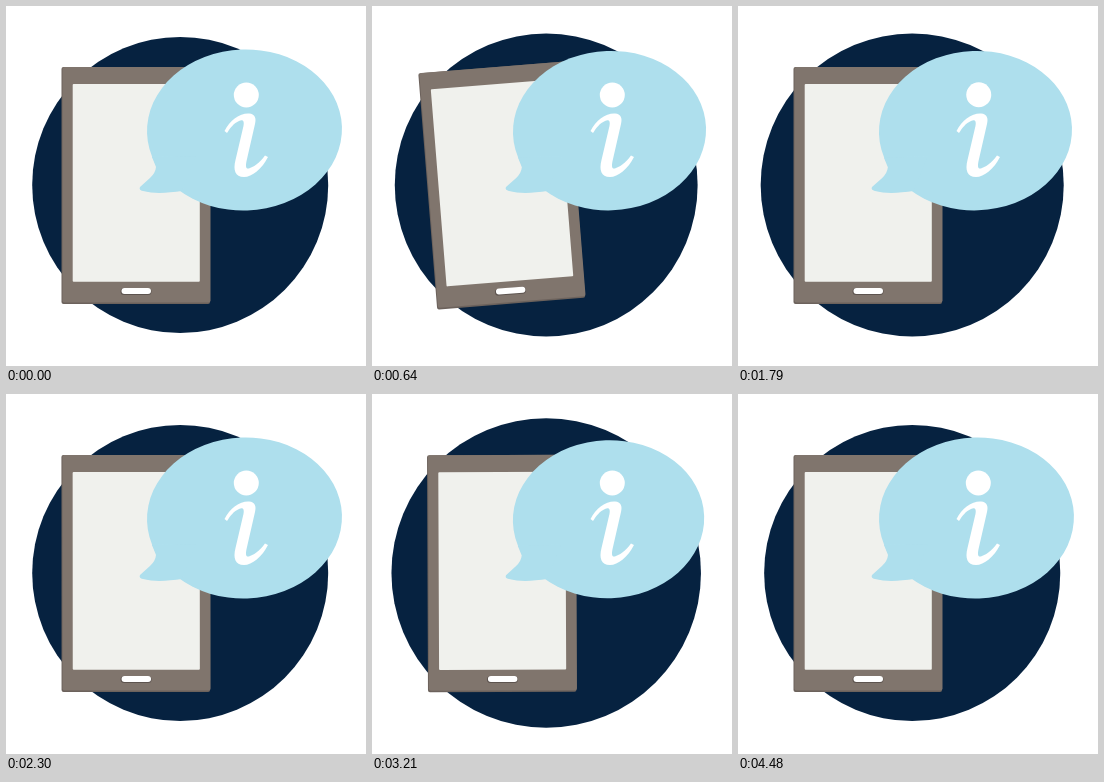
An HTML page for the animation above (4.55 s loop, 360 by 360 pixels).

```html
<!DOCTYPE html>
<html lang="en">
<head>
<meta charset="utf-8">
<style>
  html, body { margin: 0; width: 100%; height: 100%; overflow: hidden; background: #fff; }
  svg { display: block; width: 100vw; height: 100vh; }
</style>
</head>
<body>
<svg viewBox="0 0 360 360">
  <circle id="disc" cx="174.2" cy="179" r="148" fill="#062240"/>
  <g id="tablet">
    <rect x="55.5" y="61" width="148.5" height="237" rx="2" fill="#6c625c"/>
    <rect x="56.5" y="61" width="148" height="235.5" rx="2" fill="#80756d"/>
    <rect x="66.7" y="78" width="127.1" height="197.7" rx="1" fill="#f0f1ed"/>
    <rect x="114.5" y="282" width="31" height="7" rx="3.5" fill="#5d544f"/>
    <rect x="115.5" y="282" width="29.5" height="6" rx="3" fill="#fff"/>
  </g>
  <g id="bubble" fill="#aedfed">
    <ellipse cx="238.5" cy="124" rx="97.5" ry="80.5" transform="rotate(-2 238.5 124)"/>
    <path d="M146 151 L150 161 Q149.5 167 144 172 L134 181 Q132.500 184 137 185 C148 188 162 187 176 185 L190 150Z"/>
  </g>
  <g fill="#fff">
    <circle id="dot" cx="240.3" cy="89" r="12.5"/>
    <path d="M218.500 125 C224 114 234 107 243 107.500 C249 108 250.500 112 249 118 L241 153
      C239 161 240 164 244 162 C250 160 255 155 259 149.500 L262 151 C256 163 246 171 238 171
      C229 171 227 164 229.500 154 L237 122 C239 115 237 113 233 115 C228 117 224 122 221 127Z"/>
  </g>
</svg>
<script>
  const PERIOD = 2275;
  const [disc, tablet, bubble, dot] =
    ['disc', 'tablet', 'bubble', 'dot'].map(id => document.getElementById(id));

  const easeInOut = u => u < 0.5 ? 4 * u ** 3 : 1 - 4 * (1 - u) ** 3;

  // Smooth rise and fall from 0 to 1 to 0 within [start, end]
  const hump = (t, start, end) =>
    t > start && t < end ? Math.sin(Math.PI * (t - start) / (end - start)) ** 2 : 0;

  function draw(now) {
    const t = now % PERIOD;
    const phase = (t - 80 + PERIOD) % PERIOD / PERIOD;
    const pulse = easeInOut(1 - Math.abs(1 - 2 * phase));
    const nudge = 2 * hump(t, 1200, 1900);

    disc.setAttribute('r', 148 + 7.2 * pulse);
    tablet.setAttribute('transform', `rotate(${-5.6 * hump(t, 0, 1000)} 130 179.5)`);
    bubble.setAttribute('transform',
      `translate(134 190) scale(${1 - 0.02 * pulse}) translate(-134 -190)`);
    dot.setAttribute('transform', `translate(${nudge} ${-nudge / 2})`);
  }

  let start;
  function frame(now) {
    start ??= now;
    draw(now - start);
    requestAnimationFrame(frame);
  }
  draw(0);
  requestAnimationFrame(frame);
</script>
</body>
</html>
```
